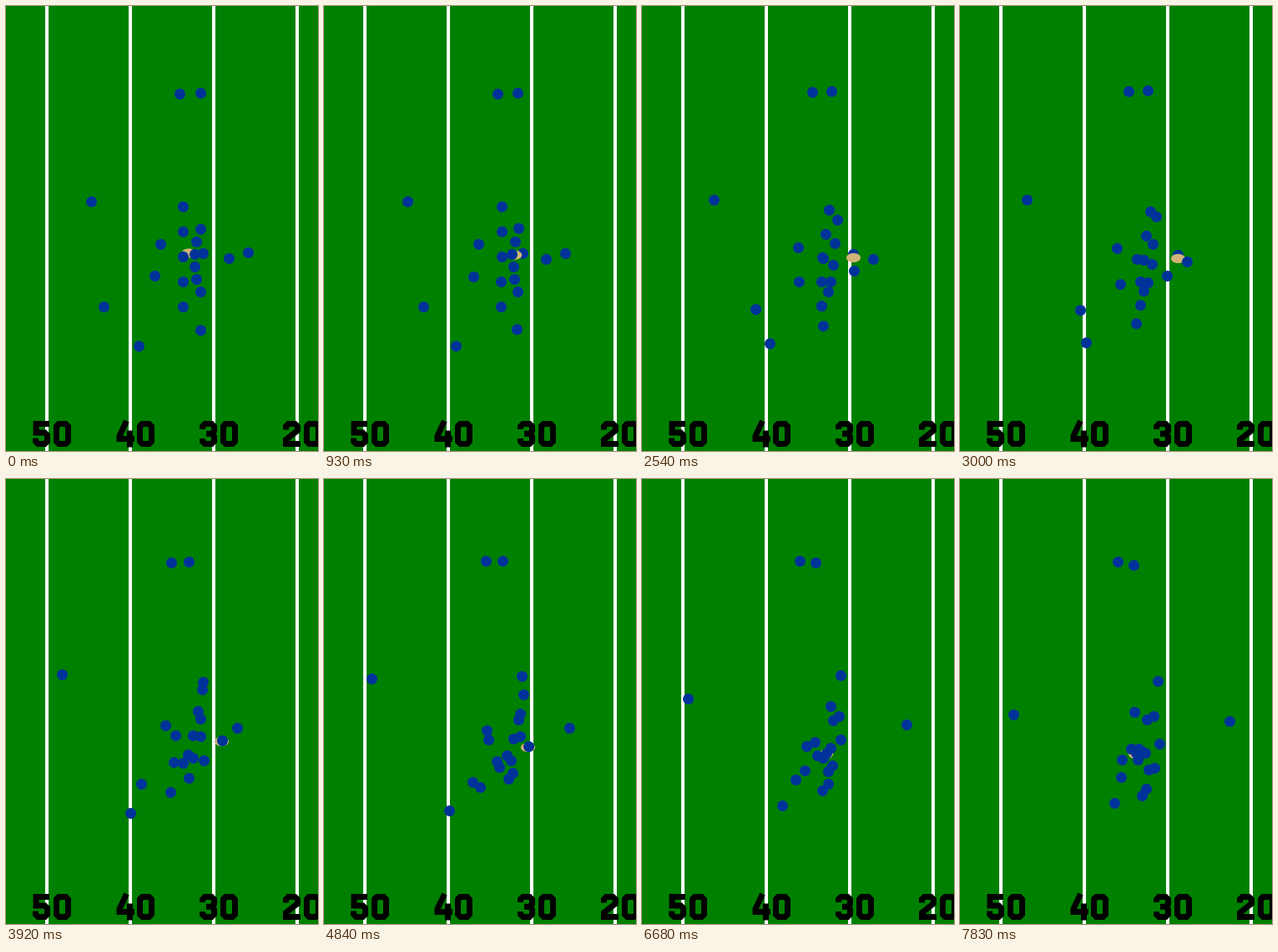
A matplotlib script that plays this animation: 374 px wide and 533 px high, repeating every 8000 ms.

```python
import numpy as np
import matplotlib.pyplot as plt
from matplotlib.animation import FuncAnimation
from matplotlib.patches import Ellipse

W, H, DPI = 374, 533, 100
LOOP, TICK = 8000, 20
STEP, LEAD, STEPS = 230, 10, 35     # the picture is redrawn every STEP ms
GRASS, PLAYER, LEATHER = "#008000", "#003399", "#d2b478"

# A route is start, turn and end; all players turn at the same step.
TURN = 21
PASSER = [(236, 296), (294, 298), (323, 290)]
CARRIER = [(290, 295), (245, 320), (211, 328)]
SNAP = (219, 296)
RUNNERS = [
    CARRIER,
    [(267, 302), (226, 352), (218, 379)],
    [(208, 105), (194, 98), (189, 99)],
    [(233, 104), (214, 98), (208, 103)],
    [(102, 234), (57, 239), (64, 282)],
    [(117, 360), (178, 363), (194, 336)],
    [(159, 407), (150, 397), (185, 388)],
    [(233, 388), (187, 369), (193, 357)],
    [(185, 285), (195, 301), (214, 323)],
    [(178, 323), (210, 345), (226, 348)],
]
# The two facing lines start evenly spaced, so only turn and end are given.
FRONT = [
    [(237, 236), (237, 242)], [(233, 288), (224, 288)], [(197, 312), (205, 323)],
    [(235, 308), (239, 317)], [(224, 337), (233, 346)], [(207, 338), (218, 326)],
]
RUSH = [
    [(239, 258), (209, 279)], [(235, 281), (232, 284)], [(227, 311), (222, 328)],
    [(219, 331), (213, 336)], [(221, 359), (223, 371)],
]

# Block digits as pen strokes in a 21 x 31 cell.
BOWL = [(17.5, 24.5), (14.5, 27.5), (6.5, 27.5), (3.5, 24.5)]
CAP = [(3.5, 6.5), (6.5, 3.5), (14.5, 3.5), (17.5, 6.5)]
DIGITS = {
    "0": [CAP + BOWL + [(3.5, 6.5), (6.5, 3.5)]],
    "2": [[(3.5, 10.5)] + CAP + [(17.5, 11.5), (3.5, 22.5), (3.5, 27.5), (21, 27.5)]],
    "3": [[(3.5, 10)] + CAP + [(17.5, 12), (14.5, 15.3), (8, 15.3)],
          [(14.5, 15.3), (17.5, 18.5)] + BOWL + [(3.5, 21)]],
    "4": [[(12.5, 0), (4, 18), (4, 21.5), (22, 21.5)], [(16, 11), (16, 31)]],
    "5": [[(20, 3.5), (4, 3.5), (4, 14), (14.5, 14), (17.5, 17)] + BOWL + [(3.5, 20.5)]],
}


def ease(n):
    """Slow off the snap, then almost steady running."""
    r = np.asarray(n) / (STEPS - 1)
    return r * np.sin(np.pi * r / 2) ** 1.4


def run(route):
    """Parabola through the route's three points, one row per step."""
    fit = np.polyfit(ease([0, TURN, STEPS - 1]), np.array(route, float), 2)
    t = ease(np.arange(STEPS))[:, None]
    return np.round(fit[0] * t * t + fit[1] * t + fit[2])


def fade(a, b):
    return np.clip((np.arange(STEPS) - a) / (b - a), 0, 1)[:, None]


def carry(passer, carrier):
    """Ball goes from the snap to the passer, then to the carrier."""
    held = SNAP + (passer + (0, 5) - SNAP) * fade(0, 8)
    return held + (carrier + (-1, 2) - held) * fade(13, 17)


def px(n):
    return n * 72 / DPI


def draw_number(text, x, y):
    for k, char in enumerate(text):
        for stroke in DIGITS[char]:
            sx, sy = np.array(stroke).T
            ax.plot(sx + x + 25 * k, sy + y, color="black", lw=px(7),
                    solid_joinstyle="miter", solid_capstyle="butt", zorder=1)


def dots(z):
    return ax.scatter([], [], s=px(13) ** 2, c=PLAYER, linewidths=0,
                      antialiased=False, zorder=z)


fig = plt.figure(figsize=(W / DPI, H / DPI), dpi=DPI, facecolor=GRASS)
ax = fig.add_axes([0, 0, 1, 1])
ax.set(xlim=(0, W), ylim=(H, 0))
ax.axis("off")

for x, label in zip(range(49, W, 100), ("50", "40", "30", "20")):
    ax.fill_betweenx([0, H], x - 2, x + 2, color="white", lw=0, zorder=0)
    draw_number(label, x - 17, 497)

passer = dots(2)
ball = ax.add_patch(Ellipse((0, 0), 17, 11, fc=LEATHER, lw=0, snap=False, zorder=3))
team = dots(4)

front = [[(226 + 1.1 * (k - 2.5) ** 2, 267 + 15 * k)] + way for k, way in enumerate(FRONT)]
rush = [[(212, 240 + 30 * k)] + way for k, way in enumerate(RUSH)]

CENTRE = (0.5, -0.5)
passer_path = run(PASSER) + CENTRE
team_path = np.stack([run(r) for r in RUNNERS + front + rush], axis=1) + CENTRE
ball_path = carry(passer_path, team_path[:, 0])


def update(frame):
    t = frame * TICK + TICK / 2
    n = min(int((t - LEAD) // STEP), STEPS - 1)
    passer.set_offsets(passer_path[n:n + 1])
    ball.set_center(ball_path[n])
    team.set_offsets(team_path[n])
    return passer, ball, team


anim = FuncAnimation(fig, update, frames=LOOP // TICK, interval=TICK,
                     repeat=True, repeat_delay=0, blit=False)
plt.show()
```
